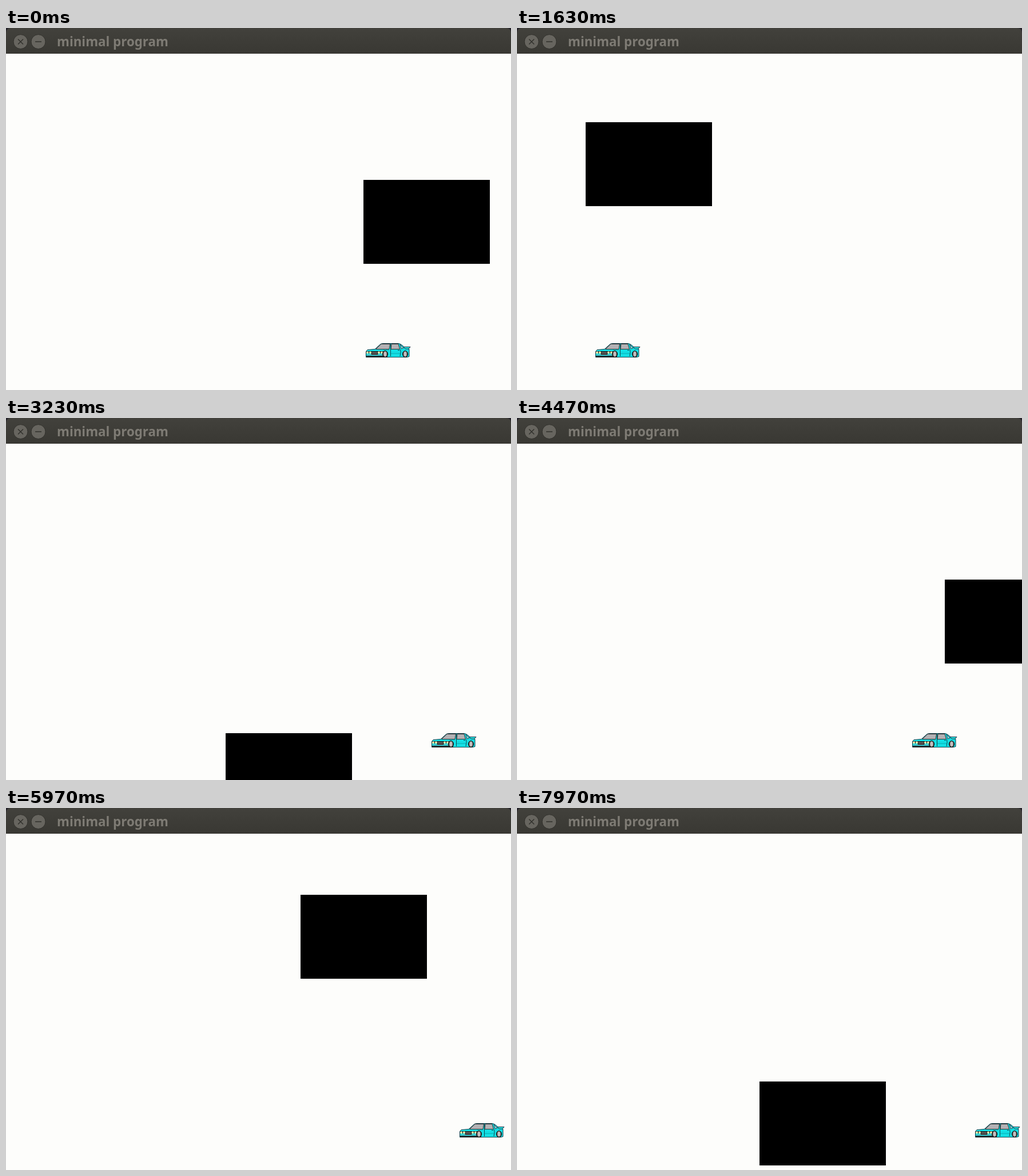
An HTML page for the animation above (8000 ms loop, 883x634 px).

```html
<!DOCTYPE html>
<html lang="en">
<head>
<meta charset="utf-8">
<title>minimal program</title>
<style>
  html, body { margin: 0; width: 100%; height: 100%; overflow: hidden; background: #fdfdfb; }
  svg { display: block; width: 100vw; height: 100vh; }
  text { font: 700 22.3px "Noto Sans", "Open Sans", sans-serif; fill: #7e7b74; }
</style>
</head>
<body>
<svg viewBox="0 0 883 634">
  <defs>
    <linearGradient id="bar" x2="0" y2="1">
      <stop offset="0" stop-color="#42413c"/>
      <stop offset="1" stop-color="#393833"/>
    </linearGradient>
    <g id="wheel" stroke="#111">
      <ellipse rx="4.5" ry="5.5" fill="#222"/>
      <ellipse rx="2.8" ry="4.4" fill="#c4bfc0" stroke="#888"/>
    </g>
  </defs>
  <rect width="883" height="634" fill="#fdfdfb"/>

  <g id="car">
    <path d="M.5 14.5 3 11.5 16 10.5 26 1.5Q28 .5 31 .5H57Q61 .5 68 7.5L76 10.5V23.5L72 24.5H.5Z" fill="#12dfe4" stroke="#123c48"/>
    <path d="M66 6.5H78L75 10H69Z" fill="#25e2e2" stroke="#234"/>
    <path d="M17.5 10.5 27 1.5H42.5L41 10.5ZM45 1.5H57L59.5 10.5H44Z" fill="#b3b1b4" stroke="#333"/>
    <path d="M60 2 66 8.5 62 10Z" fill="#9ddadb" stroke="#245"/>
    <path d="M1 14H31V18H1ZM1 22H38V25H1Z" fill="#222b2f"/>
    <path d="M10 14.5H21V19.5H10Z" fill="#555" stroke="#111"/>
    <path d="M2 20.5H30" stroke="#7fa3aa"/>
    <g fill="#fff3b0">
      <circle cx="3" cy="16.5" r="2"/><circle cx="8" cy="16.5" r="2"/>
      <circle cx="23" cy="16.5" r="2"/><circle cx="28" cy="16.5" r="2"/>
    </g>
    <path d="M43.5 1V23M60.5 11Q62 15 60 23M40 24.5H64M56 12.5H59" fill="none" stroke="#0b4b52"/>
    <path d="M31 12H41M44 18H60" stroke="#08a9b2"/>
    <use href="#wheel" x="34" y="19"/>
    <use href="#wheel" x="69" y="19"/>
  </g>

  <rect id="box" width="221" height="147"/>

  <rect width="883" height="45" fill="#24222a"/>
  <path d="M0 45V9Q0 0 9 0H874Q883 0 883 9V45Z" fill="url(#bar)"/>
  <g fill="#67655f" stroke="#32312d">
    <circle cx="25.5" cy="24" r="12.5"/>
    <circle cx="56.5" cy="24" r="12.5"/>
    <path d="M21 19.5 30 28.5M30 19.5 21 28.5M51 24H62" stroke-width="1.5"/>
  </g>
  <text x="89" y="32">minimal program</text>
</svg>
<script>
  const LOOP = 8000, FPS = 30;
  const car = document.getElementById("car");
  const box = document.getElementById("box");

  // Each track is a steady run along an endless line, as [ms, distance],
  // folded back and forth between two walls.
  const boxX = bouncer(0, 755, [[0, 625], [930, 383], [2330, -143], [3230, -384],
    [4470, -748], [5970, -995], [7137, -1310], [7970, -1086]]);
  const boxY = bouncer(46, 634, [[0, -174], [930, 569], [2330, 1638], [2951, 2098],
    [3230, 1892], [4470, 985], [5970, -60], [7970, -1563]]);
  const wideRun = bouncer(0, 805, [[0, 629], [930, 188], [2330, -462], [3230, -744]]);
  const shortRun = bouncer(640, 805, [[3230, 744], [4470, 1021], [5970, 1453], [7970, 2121]]);
  const carX = t => t < 3230 ? wideRun(t) : shortRun(t);

  function bouncer(lo, hi, keys) {
    const span = hi - lo;
    return t => {
      const next = keys.findIndex(k => k[0] > t);
      const i = next < 0 ? keys.length - 1 : next;
      const [t0, a] = keys[i - 1], [t1, b] = keys[i];
      const d = a + (b - a) * (t - t0) / (t1 - t0) - lo;
      const phase = (d % (2 * span) + 2 * span) % (2 * span);
      return Math.round(hi - Math.abs(phase - span));
    };
  }

  function draw(ms) {
    const step = Math.floor((ms % LOOP + 7) * FPS / 1000) % (LOOP * FPS / 1000);
    const t = Math.round(step * 100 / FPS) * 10;
    car.setAttribute("transform", `translate(${carX(t)} 552)`);
    box.setAttribute("x", boxX(t));
    box.setAttribute("y", boxY(t));
  }

  const start = performance.now();
  function tick() {
    draw(performance.now() - start);
    requestAnimationFrame(tick);
  }
  tick();
</script>
</body>
</html>
```
